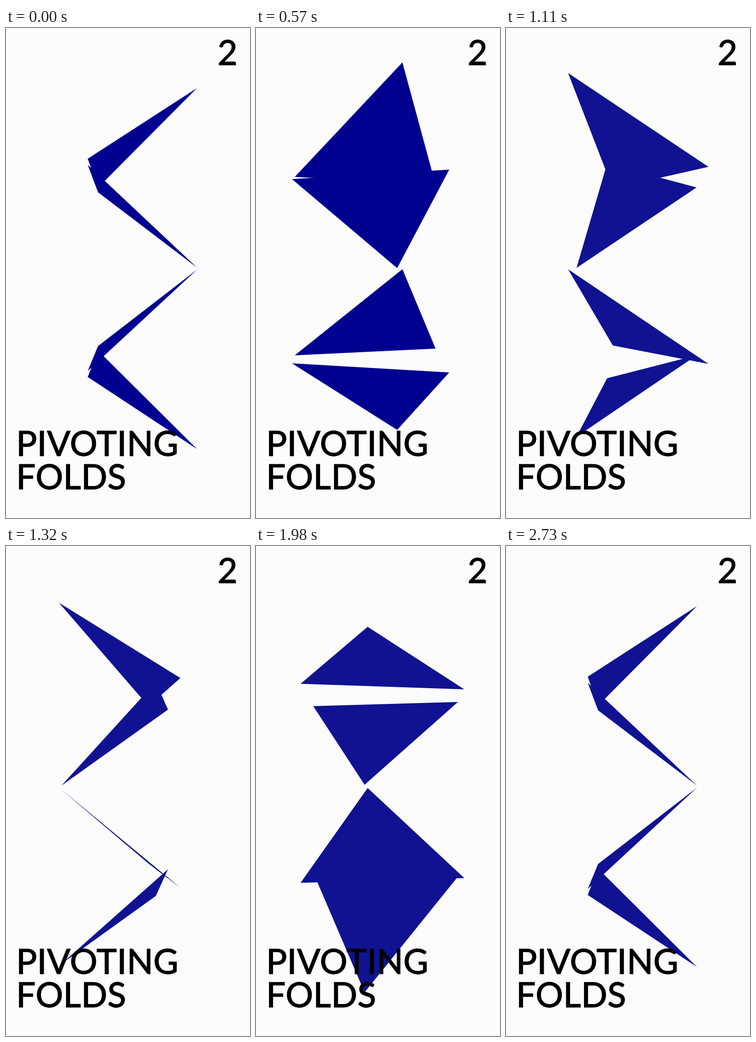
Write an HTML page with a canvas that moves like this. It is 529 by 1058 pixels and loops after 2760 ms.

```html
<!DOCTYPE html>
<html lang="en">
<head>
<meta charset="utf-8">
<title>Pivoting Folds</title>
<style>
  html, body { margin: 0; width: 100%; height: 100%; overflow: hidden; background: #fcfcfc; }
  canvas, svg { position: absolute; left: 0; top: 0; width: 529px; height: 1058px; }
  text { font: 500 75px Lato, "Open Sans", sans-serif; fill: #000; stroke: #000; stroke-width: 0.8px; }
</style>
</head>
<body>
<canvas id="stage" width="529" height="1058"></canvas>
<svg viewBox="0 0 529 1058">
  <text x="502" y="80" text-anchor="end">2</text>
  <text x="22" y="924">PIVOTING</text>
  <text x="22" y="996">FOLDS</text>
</svg>
<script>
const W = 529, H = 1058;
const CX = 265, CY = 529;
const LOOP = 2760, STEP = 30, TURN = 90;
const FOCAL = 1163;
const ctx = document.getElementById('stage').getContext('2d');

// Tip, then the two base corners, as [x, z] around the vertical axis
const corners = [[149, 0], [-75, 169], [-75, -169]];

// Heights are measured from the eye level; dir is the sense of rotation
const forms = [
  { tip: -399.3, base: -211, dir: 1 },
  { tip: -11.8, base: -199.5, dir: -1 },
  { tip: -7.3, base: 180.7, dir: 1 },
  { tip: 380, base: 191.9, dir: -1 }
];

function project([x, z], y, angle) {
  const c = Math.cos(angle), s = Math.sin(angle);
  const scale = FOCAL / (FOCAL - (x * s + z * c));
  return [CX + (x * c - z * s) * scale, CY + y * scale];
}

function drawForm({ tip, base, dir }, angle) {
  ctx.beginPath();
  corners.forEach((corner, i) => {
    ctx.lineTo(...project(corner, i ? base : tip, angle * dir));
  });
  ctx.fill();
}

function draw(now) {
  const t = now % LOOP;
  // The first pose is held for two steps
  const step = Math.max(0, Math.floor(t / STEP) - 1);
  const angle = step / TURN * Math.PI * 2;
  ctx.fillStyle = '#fcfcfc';
  ctx.fillRect(0, 0, W, H);
  ctx.fillStyle = t < 600 ? '#000090' : '#101291';
  forms.forEach(form => drawForm(form, angle));
}

function tick() {
  draw(performance.now());
  requestAnimationFrame(tick);
}
tick();
</script>
</body>
</html>
```
